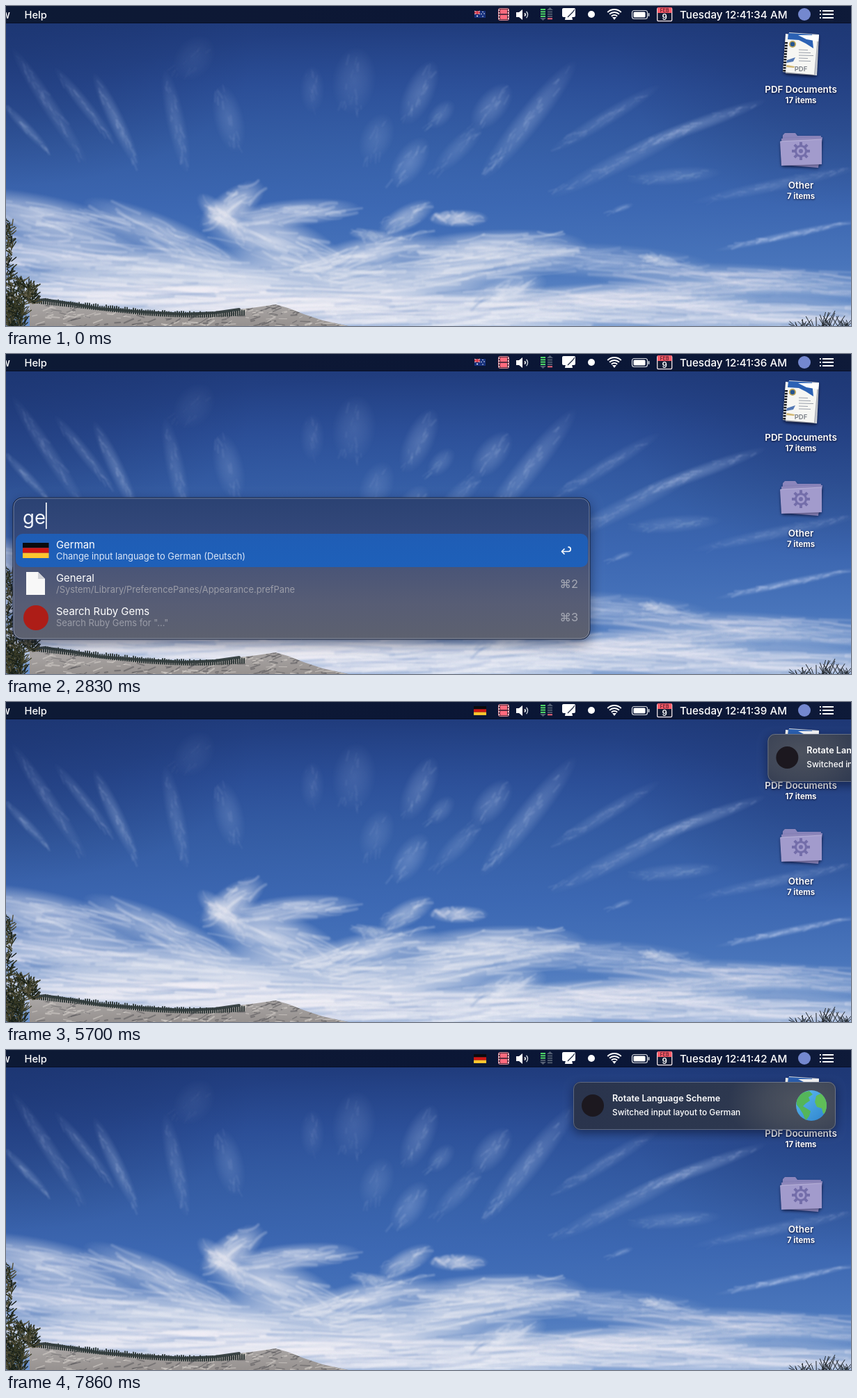
An HTML page with a canvas for the animation above (8.03 s loop, 1214x461 px).

```html
<!DOCTYPE html>
<html lang="en">
<head>
<meta charset="utf-8">
<title>Input language switch</title>
<style>
html, body { margin: 0; width: 100%; height: 100%; overflow: hidden; background: #2a4c94; }
canvas { display: block; }
</style>
</head>
<body>
<canvas id="stage" width="1214" height="461"></canvas>
<script>
const W = 1214, H = 461, LOOP = 8030;
const stage = document.getElementById('stage').getContext('2d');
const FONT = 'Inter, Roboto, sans-serif';
let g = stage;

let seed = 7;
function rnd() {
  seed = (seed * 16807) % 2147483647;
  return seed / 2147483647;
}
const spread = a => (rnd() - 0.5) * 2 * a;

function layer(paint) {
  const c = document.createElement('canvas');
  c.width = W; c.height = H;
  const old = g;
  g = c.getContext('2d');
  paint();
  g = old;
  return c;
}
function rect(x, y, w, h, color) { g.fillStyle = color; g.fillRect(x, y, w, h); }
function box(x, y, w, h, r, fill, line) {
  g.beginPath();
  g.roundRect(x, y, w, h, r);
  if (fill) { g.fillStyle = fill; g.fill(); }
  if (line) { g.strokeStyle = line; g.stroke(); }
}
function disc(x, y, r, color) {
  g.beginPath(); g.arc(x, y, r, 0, 7); g.fillStyle = color; g.fill();
}
function path(pts, close) {
  g.beginPath();
  for (let i = 0; i < pts.length; i += 2) g.lineTo(pts[i], pts[i + 1]);
  if (close) g.closePath();
}
function poly(color, ...pts) { path(pts, true); g.fillStyle = color; g.fill(); }
function line(color, width, ...pts) {
  path(pts); g.strokeStyle = color; g.lineWidth = width; g.stroke();
}
function text(s, x, y, size, weight = 400, color = '#fff', align = 'left') {
  g.font = `${weight} ${size}px ${FONT}`;
  g.textAlign = align;
  g.fillStyle = color;
  g.fillText(s, x, y);
}
function ramp(x0, y0, x1, y1, ...colors) {
  const f = g.createLinearGradient(x0, y0, x1, y1);
  colors.forEach((c, i) => f.addColorStop(i / (colors.length - 1), c));
  return f;
}
function glow(x, y, rx, ry, turn, rgb, alpha) {
  g.save();
  g.translate(x, y); g.rotate(turn); g.scale(rx, ry);
  const f = g.createRadialGradient(0, 0, 0, 0, 0, 1);
  f.addColorStop(0, `rgba(${rgb},${alpha})`);
  f.addColorStop(0.5, `rgba(${rgb},${alpha * 0.6})`);
  f.addColorStop(1, `rgba(${rgb},0)`);
  g.fillStyle = f;
  g.fillRect(-1, -1, 2, 2);
  g.restore();
}

// Soft cloud: a glow combed with fine bright and blue fibres
function cloud([x, y, rx, ry, turn, alpha]) {
  glow(x, y, rx, ry, turn, '238,238,244', alpha);
  g.save();
  g.translate(x, y); g.rotate(turn);
  const n = 12 + rx * 0.22;
  for (let i = 0; i < n; i++) {
    const u = spread(0.75) * rx, v = spread(0.6) * ry, l = rx * (0.1 + rnd() * 0.2);
    const lit = rnd() < 0.72;
    g.strokeStyle = lit ? `rgba(244,243,248,${alpha * 0.32})` : `rgba(84,124,190,${alpha * 0.2})`;
    g.lineWidth = 1 + rnd() * 4;
    g.beginPath();
    g.moveTo(u - l, v + spread(6));
    g.quadraticCurveTo(u, v + spread(8), u + l, v + spread(6));
    g.stroke();
  }
  g.restore();
}
// Thin high streak made of short ribs
function streak([x0, y0, x1, y1, w, alpha]) {
  const a = Math.atan2(y1 - y0, x1 - x0), len = Math.hypot(x1 - x0, y1 - y0);
  glow((x0 + x1) / 2, (y0 + y1) / 2, len * 0.58, w, a, '175,195,232', alpha * 0.8);
  for (let i = 0; i < len / 5; i++) {
    const k = rnd(), x = x0 + (x1 - x0) * k + spread(w * 0.45), y = y0 + (y1 - y0) * k + spread(w * 0.35);
    const l = 5 + rnd() * 10, b = a + spread(0.35);
    line(`rgba(200,213,240,${alpha * 0.35})`, 1 + rnd() * 2, x, y, x + Math.cos(b) * l, y + Math.sin(b) * l);
  }
}
const clouds = [
  [50, 305, 150, 34, 0.2, 0.7], [90, 365, 230, 46, 0.1, 0.75], [225, 330, 125, 28, 0.4, 0.62],
  [325, 288, 55, 24, -0.6, 0.75], [312, 306, 50, 18, 0.75, 0.7], [415, 298, 95, 20, -0.08, 0.65],
  [385, 340, 110, 42, 0.35, 0.8], [330, 395, 280, 46, 0.05, 0.85], [515, 360, 110, 28, -0.22, 0.8],
  [575, 305, 45, 18, -0.5, 0.55], [650, 306, 44, 13, 0, 0.7], [525, 330, 34, 9, 0.1, 0.5],
  [695, 350, 140, 28, -0.05, 0.85], [625, 385, 200, 32, -0.12, 0.8], [850, 367, 170, 26, 0.05, 0.35]
];
const horizon = [
  [130, 420, 330, 38, 0.03, 0.95], [470, 432, 400, 42, 0, 1], [760, 438, 330, 34, -0.04, 0.7],
  [1060, 445, 300, 30, 0.03, 0.75], [1070, 398, 230, 27, 0.05, 0.5], [941, 367, 32, 9, 0.2, 0.45],
  [900, 415, 240, 20, -0.04, 0.5], [720, 412, 60, 22, -0.3, 0.6]
];
const streaks = [
  [0, 145, 60, 208, 8, 0.35], [15, 70, 110, 218, 12, 0.25], [75, 95, 150, 190, 10, 0.28],
  [130, 105, 186, 224, 12, 0.4], [230, 100, 258, 232, 14, 0.28], [310, 120, 330, 205, 22, 0.28],
  [505, 65, 495, 150, 32, 0.22], [612, 85, 575, 165, 22, 0.35], [600, 195, 560, 255, 22, 0.42],
  [640, 140, 610, 172, 15, 0.3], [720, 118, 675, 172, 22, 0.4], [680, 175, 620, 235, 16, 0.28],
  [810, 90, 690, 240, 19, 0.42], [545, 160, 520, 220, 24, 0.25], [930, 120, 790, 205, 12, 0.28]
];
const farStreaks = [
  [1080, 140, 900, 205, 11, 0.45], [990, 170, 795, 268, 15, 0.32], [1214, 235, 1000, 280, 10, 0.26],
  [1020, 240, 900, 250, 13, 0.3], [1214, 311, 1030, 350, 6, 0.65], [900, 286, 870, 296, 5, 0.4],
  [440, 90, 440, 150, 18, 0.18], [290, 50, 250, 100, 28, 0.12]
];

function pine(x, y, h, w, n) {
  for (let i = 0; i < n; i++) {
    const px = x + spread(w * 0.6), py = y + rnd() * h, a = -1.57 + spread(1.35), l = 6 + rnd() * 7;
    line(['#151c16', '#232a1e', '#3b3d28', '#54503a'][Math.floor(rnd() * 4)], 1.4,
      px, py, px + Math.cos(a) * l, py + Math.sin(a) * l);
  }
}
function land() {
  const ridge = [34, 426, 55, 423, 95, 429, 135, 436, 200, 441, 255, 444, 300, 442, 335, 437, 360, 434,
    387, 430, 405, 435, 428, 444, 455, 453, 492, 461];
  g.save();
  path([...ridge, 34, 461], true);
  g.fillStyle = ramp(0, 428, 0, 461, '#aaa6a5', '#96918f');
  g.fill();
  g.clip();
  for (let i = 0; i < 260; i++) {
    const x = 35 + rnd() * 445, y = 430 + rnd() * 34, l = 3 + rnd() * 11;
    line(['rgba(65,66,70,.4)', 'rgba(211,205,200,.6)'][i % 2], 1 + rnd() * 1.5, x, y, x + l, y - l * (rnd() - 0.3));
  }
  g.restore();
  line('#3b4547', 4, ...ridge.slice(0, 16));
  for (let x = 45; x < 345; x += 3) {
    const y = x < 200 ? 424 + (x - 45) * 0.11 : 441 + Math.sin((x - 200) / 46) * 3;
    line('#313b3b', 2, x, y + 4, x, y - 1 - rnd() * 3);
  }
  pine(2, 310, 151, 12, 210);
  pine(18, 395, 55, 15, 120);
  pine(36, 405, 24, 10, 65);
  pine(12, 430, 36, 26, 150);
  for (let i = 0; i < 48; i++) {
    const x = 1136 + rnd() * 78;
    line('#20262b', 1, x, 464, x + spread(14), 461 - rnd() * 22 * (1 - Math.abs(x - 1178) / 60));
  }
}
const gear = (x, y, r, color) => {
  g.save(); g.translate(x, y);
  for (let i = 0; i < 8; i++) { g.rotate(Math.PI / 4); rect(-2, -r - 4, 4, 6, color); }
  g.beginPath(); g.arc(0, 0, r - 1.5, 0, 7);
  g.strokeStyle = color; g.lineWidth = 3; g.stroke();
  g.restore();
  disc(x, y, 3, color);
};
function folder() {
  g.save();
  g.shadowColor = 'rgba(0,0,30,.4)'; g.shadowBlur = 4; g.shadowOffsetY = 2;
  poly('#8b86bc', 1116, 186, 1119, 183, 1134, 183, 1137, 187, 1171, 187, 1168, 229, 1114, 226);
  poly('#9089bd', 1114, 191, 1173, 189, 1167, 233, 1117, 229);
  poly('#a29bcc', 1112, 195, 1172, 192, 1172, 228, 1114, 230);
  g.restore();
  line('rgba(225,220,245,.45)', 1, 1113, 195, 1172, 192);
  gear(1142, 209, 9, '#746eaa');
}
function papers() {
  g.save();
  g.shadowColor = 'rgba(0,0,20,.5)'; g.shadowBlur = 4; g.shadowOffsetY = 2;
  poly('#dcdfe2', 1125, 38, 1168, 41, 1165, 100, 1120, 97);
  poly('#f6f6f3', 1120, 40, 1166, 45, 1161, 99, 1116, 95);
  g.restore();
  poly('#2b61b4', 1124, 39, 1158, 41, 1160, 61, 1149, 54, 1139, 49, 1123, 48);
  poly('#fff', 1138, 42, 1168, 42, 1167, 51, 1150, 48);
  disc(1130, 55, 5, '#b9a45c'); disc(1130, 55, 3.2, '#26558f');
  for (let y = 52; y < 95; y += 4) rect(1116 + (95 - y) / 14, y, 4, 2.5, '#171a22');
  for (let i = 0; i < 5; i++) line('#9aa0ab', 1, 1139, 63 + i * 4, 1152 + i % 3 * 4, 63.5 + i * 4);
  poly('#5378b4', 1122, 78, 1134, 74, 1131, 80, 1121, 82);
  poly('#d2b772', 1122, 85, 1133, 87, 1132, 89, 1121, 88);
  text('PDF', 1142, 94, 9.5, 600, '#777c84', 'center');
}
function label(name, count, y) {
  g.save();
  g.shadowColor = 'rgba(0,0,25,.9)'; g.shadowBlur = 3; g.shadowOffsetY = 1;
  text(name, 1142, y, 13.4, 600, '#fff', 'center');
  text(count, 1142, y + 15, 11.4, 700, '#fff', 'center');
  g.restore();
}
function menuBar() {
  rect(0, 0, W, 25, ramp(0, 0, W, 0, '#0d1a35', '#0d1835', '#0a1636', '#0e1a39'));
  rect(0, 24, W, 1, 'rgba(5,10,30,.6)');
  text('View', 6, 17.6, 15, 500, '#fff', 'right');
  text('Help', 26.5, 17.6, 14.7, 500);
  box(707.5, 3.5, 15, 17, 2, '#5c2c40', '#d98995');
  rect(710, 5, 10, 6, '#ff6b7e'); rect(710, 13, 10, 6, '#ff6b7e');
  for (let y = 5; y < 20; y += 4) { rect(708, y, 1, 2, '#fff'); rect(721, y, 1, 2, '#fff'); }
  poly('#fff', 733, 9, 737, 9, 742, 5, 742, 20, 737, 16, 733, 16);
  for (const r of [3, 6.5]) {
    g.beginPath(); g.arc(743, 12.5, r, -0.8, 0.8);
    g.strokeStyle = r > 5 ? '#c6cad3' : '#fff'; g.lineWidth = 1.5; g.stroke();
  }
  box(799, 3, 19, 13, 2, '#fff');
  poly('#fff', 804, 15, 813, 15, 814, 20, 803, 20);
  line('#17213b', 1.2, 807, 16, 814, 9, 817, 5);
  disc(841, 12, 5, '#fff');
  g.lineWidth = 2; g.strokeStyle = '#fff';
  for (const r of [6, 10, 14]) { g.beginPath(); g.arc(874, 19, r, -2.34, -0.8); g.stroke(); }
  poly('#fff', 874, 20, 871, 16, 877, 16);
  g.lineWidth = 1.2;
  box(899.5, 6.5, 22, 12, 3, null, '#d8dbe2');
  box(901.5, 8.5, 17, 8, 1.5, '#fff');
  box(922.5, 10, 2, 5, 1, '#c9cdd6');
  g.lineWidth = 1.3;
  box(935.7, 2.7, 21, 19, 2, '#111b34', '#f1e4e8');
  rect(936, 2, 20.5, 8, '#ff5c69');
  text('FEB', 946.2, 8.8, 7, 500, '#3d1725', 'center');
  text('9', 946.2, 20, 11.5, 600, '#fff', 'center');
  disc(1147, 12, 9, '#7488cf');
  for (const y of [7, 12, 17]) { rect(1169, y - 1, 2, 2, '#fff'); rect(1173, y - 1, 16, 2, '#fff'); }
}
const desktop = layer(() => {
  rect(0, 0, W, H, ramp(0, 25, 0, H, '#203c7d', '#294a92', '#33599f', '#3c66b0', '#4975bb', '#6f95cd'));
  glow(600, 230, 620, 200, 0, '62,112,190', 0.28);
  glow(0, 60, 360, 200, 0, '22,42,94', 0.35);
  glow(W, 70, 330, 230, 0, '25,45,98', 0.35);
  g.lineCap = 'round';
  g.filter = 'blur(1.2px)';
  streaks.forEach(streak);
  farStreaks.forEach(streak);
  clouds.forEach(cloud);
  horizon.forEach(cloud);
  g.filter = 'none';
  land();
  g.lineCap = 'butt';
  papers();
  folder();
  label('PDF Documents', '17 items', 124.8);
  label('Other', '7 items', 262.8);
  menuBar();
});

function flag(x, y, w, h) {
  ['#0b0b0d', '#cf1712', '#ffc62e'].forEach((c, i) => rect(x, y + i * h / 3, w, h / 3, c));
}
function southFlag() {
  rect(673, 7, 16, 10, '#16317d');
  rect(673, 7, 8, 5, '#a8475f');
  line('#e9e2ec', 0.8, 673, 7, 681, 12); line('#e9e2ec', 0.8, 681, 7, 673, 12);
  rect(676.2, 7, 1.6, 5, '#dd3142'); rect(673, 8.8, 8, 1.4, '#dd3142');
  disc(677, 14.6, 1, '#fff');
  [[685, 8.6], [683, 11.4], [687, 11], [685, 15]].forEach(([x, y]) => disc(x, y, 0.75, '#fff'));
}
// Network meter: received bars, download arrow, sent bars
function meter(t) {
  const full = t < 460 || t >= 1630 && t < 7560;
  const arrow = t >= 4500 && t < 5600;
  const sent = t < 460 || t >= 1630 && t < 4500 || t >= 5600 && t < 6500;
  [4, 7.3, 10.6, 14].forEach((y, i) => rect(768, y, 7, 2, i < 3 || full ? '#50d768' : '#4d596c'));
  poly(arrow ? '#50d768' : '#566175', 767, 17, 776, 17, 771.5, 21);
  poly('#566175', 777, 6, 786, 6, 781.5, 2);
  [7.5, 10.8, 14, 17.3].forEach((y, i) => rect(778, y, 7, 2, i === 3 && sent ? '#f06477' : '#4d596c'));
}

const keys = [[2530, 'g'], [2700, 'ge'], [2860, 'ger'], [3060, 'germ'], [3230, 'germa'], [3830, 'german']];
const caretOff = [[1800, 2360], [3800, 3830], [4400, 4960]];
const rows = [
  ['German', 'Change input language to German (Deutsch)'],
  ['General', '/System/Library/PreferencePanes/Appearance.prefPane'],
  ['Search Ruby Gems', 'Search Ruby Gems for "..."']
];
function returnArrow() {
  g.lineCap = g.lineJoin = 'round';
  g.beginPath();
  g.moveTo(799, 284.5); g.lineTo(808, 284.5);
  g.arc(808, 281.3, 3.2, 1.57, -1.57, true);
  g.strokeStyle = '#fff'; g.lineWidth = 1.7; g.stroke();
  line('#fff', 1.7, 802, 281, 798.5, 284.5, 802, 288);
  g.lineCap = 'butt'; g.lineJoin = 'miter';
}
function row(i) {
  const y = 259 + i * 48;
  if (!i) {
    box(14, y, 822, 48, 10, ramp(0, y, 0, y + 48, '#1f5db5', '#1e60b9'));
    flag(24, 272, 37.5, 22);
    returnArrow();
  } else {
    text('⌘' + (i + 1), 822, y + 30, 16.4, 400, '#a6a9b4', 'right');
  }
  if (i === 1) {
    poly('#f8f8f8', 29, 314, 46, 314, 56, 324, 56, 347, 29, 347);
    poly('#d2d3d8', 46, 314, 56, 324, 46, 324);
  }
  if (i === 2) disc(43, 380, 18, '#ad1d17');
  text(rows[i][0], 72, y + 21, 14.9, 400);
  text(rows[i][1], 72, y + 36.5, 12.9, 400, i ? '#9b9da8' : '#dce7f8');
}
function panel(t) {
  const key = keys.filter(k => k[0] <= t).pop();
  const typed = key ? key[1] : '';
  const count = t < 2560 ? 0 : t < 2860 ? 3 : 1;
  const bottom = t >= 2560 && t < 2730 ? 480 : [260, 314.5, 0, 411][count];
  g.save();
  g.shadowColor = 'rgba(5,12,40,.55)'; g.shadowBlur = 18; g.shadowOffsetY = 6;
  box(10, 207, 829, bottom - 207, 13, '#263f72');
  g.restore();
  const fill = count ? ramp(0, 207, 0, 411, '#2b4273', '#33487a', '#4a5577', '#575d75', '#5d616f')
    : ramp(0, 207, 0, 260, '#253f74', '#263f70');
  g.lineWidth = 1;
  box(10, 207, 829, bottom - 207, 13, fill, '#101a34');
  box(11, 208, 827, bottom - 209, 12, null, 'rgba(195,205,228,.48)');
  for (let i = 0; i < count; i++) row(i);
  text(typed, 24, 245, 27.6, 400, '#f2f5fc');
  if (!caretOff.some(([a, b]) => t >= a && t < b)) {
    rect(24 + g.measureText(typed).width, 214, 1.6, 38, '#fff');
  }
}
function notice(t) {
  const k = Math.min(1, Math.max(0, (t - 5535) / 450));
  const x = 1214 - 399 * (1 - Math.cos(Math.PI * k)) / 2;
  g.save();
  g.shadowColor = 'rgba(5,10,30,.5)'; g.shadowBlur = 14; g.shadowOffsetY = 5;
  box(x, 46, 377, 69, 10, '#2b3549');
  g.restore();
  g.save();
  box(x, 46, 377, 69, 10, ramp(x, 0, x + 377, 0, '#2a344d', '#2c374f', '#303a50'));
  g.clip();
  glow(1142, 75, 105, 70, 0, '104,106,108', 0.55);
  g.restore();
  g.lineWidth = 1;
  box(x + 0.5, 46.5, 376, 68, 10, null, 'rgba(180,190,210,.38)');
  disc(x + 28, 80, 16, '#1c181f');
  text('Rotate Language Scheme', x + 56, 74.4, 12.6, 600);
  text('Switched input layout to German', x + 56, 94, 11.85, 500);
  globe(x + 342, 80);
}
function globe(x, y) {
  g.save();
  g.translate(x, y);
  disc(0, 0, 22, ramp(-15, -18, 15, 18, '#58b4ec', '#348bd2'));
  g.clip();
  poly('#54b55a', -22, -9, -15, -18, -3, -21, 2, -16, -4, -12, -2, -7, -8, -3, -12, 1, -7, 4, -1, 8, -3, 15, -8, 22, -12, 12, -17, 4, -21, -1);
  poly('#60bd58', 7, -14, 15, -18, 23, -8, 23, 10, 17, 12, 15, 4, 8, 2, 5, -5);
  g.restore();
}

function draw(t) {
  g.drawImage(desktop, 0, 0);
  if (t < 5360) southFlag(); else flag(672, 6, 18, 13);
  meter(t);
  const sec = 34 + Math.floor((t + 140) / 1000);
  text(`Tuesday 12:41:${sec} AM`, 968, 17.6, 15.2, 500);
  if (t >= 1230 && t < 5300) panel(t);
  if (t >= 5540) notice(t);
}
const start = performance.now();
function tick() {
  draw((performance.now() - start) % LOOP);
  requestAnimationFrame(tick);
}
tick();
</script>
</body>
</html>
```
